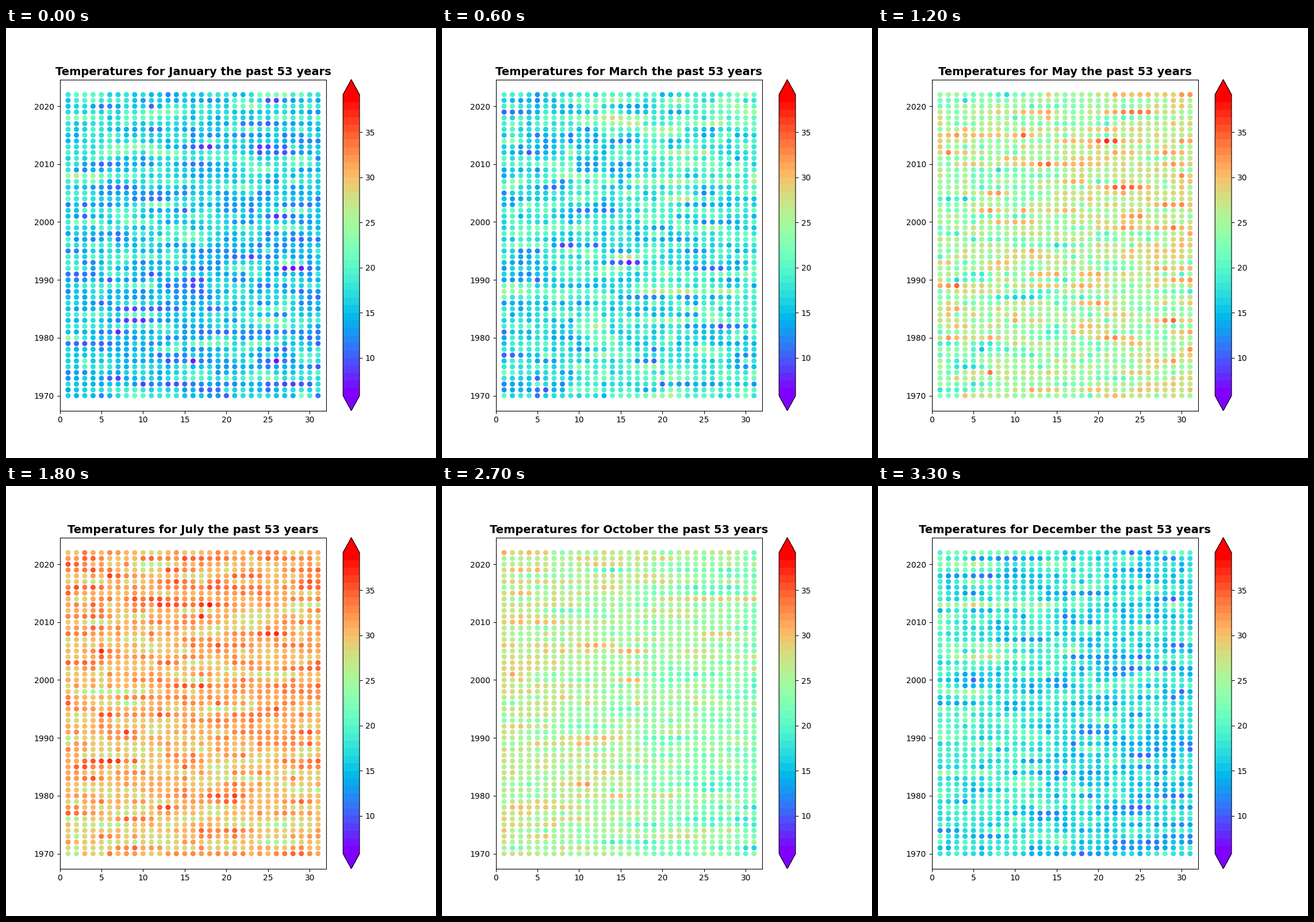
These frames come from a looping animation (748 px wide and 748 px high, 3.6 s). A matplotlib script:

```python
import numpy as np
import matplotlib.pyplot as plt
from matplotlib.animation import FuncAnimation

SIZE, DPI = 748, 100
LOW, HIGH = 5.83, 39.14
YEARS = np.arange(1970, 2023)
MONTHS = ("January February March April May June July August "
          "September October November December").split()
LENGTHS = [29 if m == 2 else 30 + (m + m // 8) % 2 for m in range(1, 13)]
STARTS = np.cumsum([0] + LENGTHS)


def season(day, mid, swing, peak):
    """Yearly wave that is highest on the day `peak`."""
    return mid + swing * np.cos(2 * np.pi * (day - peak) / 366)


def daily_noise(count, keep=0.7):
    """Unit noise in which each day leans on the day before."""
    noise = np.random.default_rng(53).normal(size=count)
    for d in range(1, count):
        noise[d] = keep * noise[d - 1] + np.sqrt(1 - keep**2) * noise[d]
    return noise


def make_record():
    """Temperatures as one row per year, one column per day."""
    day = np.arange(1, 367)
    noise = daily_noise(len(YEARS) * 366).reshape(len(YEARS), 366)
    warming = 0.02 * (YEARS - YEARS.mean())[:, None]
    temps = season(day, 23.2, -7.8, 28) + warming
    temps = temps + season(day, 2.6, 0.8, 75) * noise
    return np.clip(temps, LOW, HIGH)


RECORD = make_record()


def month_data(i):
    """Day/year positions and temperatures of one month."""
    temps = RECORD[:, STARTS[i]:STARTS[i + 1]]
    day, year = np.meshgrid(np.arange(1, LENGTHS[i] + 1), YEARS)
    valid = (i != 1) | (day < 29) | (year % 4 == 0)
    return np.column_stack([day[valid], year[valid]]), temps[valid]


plt.rcParams["font.family"] = "DejaVu Sans"
fig, ax = plt.subplots(figsize=(SIZE / DPI, SIZE / DPI), dpi=DPI)
points, temps = month_data(0)
dots = ax.scatter(*points.T, c=temps, s=42, linewidths=0,
                  cmap=plt.get_cmap("rainbow", 40), vmin=LOW, vmax=HIGH)
ax.set_xlim(0, 32)
ax.set_ylim(1967.4, 2024.6)
fig.colorbar(dots, ax=ax, extend="both")
title = ax.set_title("", fontsize=14, fontweight="bold", pad=5.6)


def update(i):
    points, temps = month_data(i)
    dots.set_offsets(points)
    dots.set_array(temps)
    title.set_text(f"Temperatures for {MONTHS[i]} the past {len(YEARS)} years")
    return dots, title


anim = FuncAnimation(fig, update, frames=len(MONTHS), interval=300,
                     init_func=lambda: update(0), repeat=True, repeat_delay=0)
plt.show()
```
